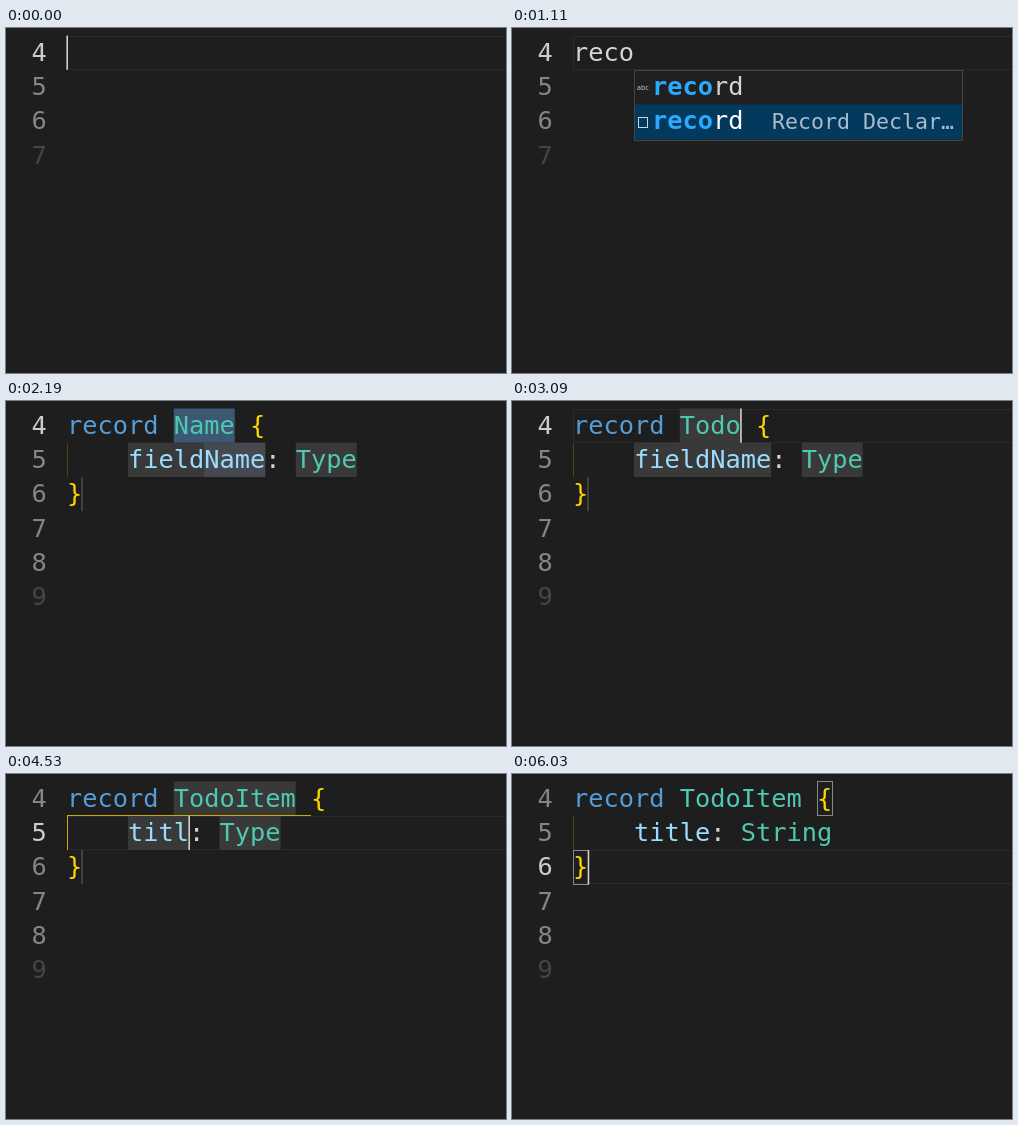
An HTML page with a canvas for the animation above (6.06 s loop, 500 by 345 pixels).

```html
<!DOCTYPE html>
<html lang="en">
<head>
<meta charset="utf-8">
<title>Record snippet</title>
<style>
html, body { margin: 0; width: 100%; height: 100%; overflow: hidden; background: #1e1e1e; }
canvas { display: block; width: 500px; height: 345px; }
</style>
</head>
<body>
<canvas id="stage"></canvas>
<script>
const LOOP = 6060, W = 500, H = 345;
const CELL = 15.25, LEFT = 61, TOP = 7.5, ROW = 34.25;
const ADVANCE = 0.602, SIZE = CELL / ADVANCE;
const MONO = '"DejaVu Sans Mono", "Noto Sans Mono", monospace';

const COLOR = {
  bg: '#1e1e1e', text: '#d4d4d4', keyword: '#569cd6', type: '#4ec9b0',
  field: '#9cdcfe', brace: '#ffd700', number: '#858585', active: '#cccccc',
  dim: '#454545', line: '#2a2a2a', slot: '#393939', select: '#3d5875',
  match: '#464a50', caret: '#d0d0d0'
};

// Key times in ms
const KEYS = {
  start: [300, 360, 540, 600],
  name: [2520, 2580, 2760, 2820, 3150, 3210, 3390, 3450],
  field: [4230, 4290, 4470, 4530, 4710],
  type: [5250, 5310, 5490, 5550, 5670, 5730]
};
const POPUP = 780, DOWN = 1020, ACCEPT = 1320, TAB1 = 3690, TAB2 = 4950, DONE = 5910;
const PRESSES = [...Object.values(KEYS).flat(), ACCEPT, TAB1, TAB2, DONE];

const canvas = document.getElementById('stage');
const ctx = canvas.getContext('2d');
const scale = window.devicePixelRatio || 1;
canvas.width = W * scale;
canvas.height = H * scale;

const colX = col => LEFT + col * CELL;
const rowY = row => TOP + row * ROW;

function box(x, y, w, h, color) {
  ctx.fillStyle = color;
  ctx.fillRect(x, y, w, h);
}

function frame(x, y, w, h, color) {
  ctx.strokeStyle = color;
  ctx.lineWidth = 1;
  ctx.strokeRect(x + 0.5, y + 0.5, w - 1, h - 1);
}

function print(str, x, row, color, size = SIZE, weight = 400) {
  ctx.font = `${weight} ${size}px ${MONO}`;
  ctx.fillStyle = color;
  ctx.fillText(str, x, Math.round(rowY(row) + 25.3));
}

function cells(row, col, count, color) {
  box(colX(col), rowY(row), count * CELL, ROW, color);
}

function typed(word, times, t) {
  return word.slice(0, times.filter(k => k <= t).length);
}

function lineNumbers(last, current) {
  for (let n = 4; n <= last; n++) {
    const color = n === current ? COLOR.active : n === last ? COLOR.dim : COLOR.number;
    print(String(n), 25.5, n - 4, color);
  }
}

function currentLine(row) {
  frame(LEFT, Math.round(rowY(row)), W - LEFT + 2, 34, COLOR.line);
}

function caret(row, col, t) {
  const last = Math.max(0, ...PRESSES.filter(k => k <= t));
  const phase = (t - last) % 1000;
  let alpha = 0;
  if (phase < 400) alpha = 1;
  else if (phase < 500) alpha = (500 - phase) / 100;
  else if (phase > 920) alpha = (phase - 920) / 80;
  ctx.globalAlpha = alpha;
  box(colX(col) - 0.6, rowY(row), 1.6, ROW, COLOR.caret);
  ctx.globalAlpha = 1;
}

function popup(t) {
  const x = 122, y = 42, w = 329, h = 71, pick = t >= DOWN ? 1 : 0;
  box(x, y, w, h, '#202020');
  box(x + 1, pick ? 76.5 : 43, w - 2, 35, '#04395e');
  frame(x, y, w, h, '#454545');
  for (let i = 0; i < 2; i++) {
    const row = i + 1;
    print('reco', 140, row, '#2aaaff', SIZE, 700);
    print('rd', 140 + 4 * CELL, row, i === pick ? '#ffffff' : COLOR.text);
  }
  ctx.font = '7px "Open Sans", sans-serif';
  ctx.fillStyle = COLOR.text;
  ctx.fillText('abc', 125, 62);
  frame(126, 89, 10, 11, COLOR.text);
  if (pick) print('Record Declar…', 260, 2, '#a9bccb', 13 / ADVANCE);
}

function drawStart(t) {
  const word = typed('reco', KEYS.start, t);
  currentLine(0);
  lineNumbers(7, 4);
  print(word, LEFT, 0, COLOR.text);
  caret(0, word.length, t);
  if (t >= POPUP) popup(t);
}

function drawRecord(t) {
  const name = typed('TodoItem', KEYS.name, t) || 'Name';
  const field = typed('title', KEYS.field, t) || 'fieldName';
  const type = typed('String', KEYS.type, t) || 'Type';
  const step = t < TAB1 ? 0 : t < TAB2 ? 1 : t < DONE ? 2 : 3;
  const row = [0, 1, 1, 2][step];
  const typeCol = 4 + field.length + 2;
  const braceCol = 7 + name.length + 1;
  const ends = [7 + name.length, 4 + field.length, typeCol + type.length, 1];
  const firstKey = [KEYS.name, KEYS.field, KEYS.type][step];
  const selected = step < 3 && t < firstKey[0];

  if (!selected) currentLine(row);

  if (step < 3) {
    const slots = [[0, 7, name], [1, 4, field], [1, typeCol, type]];
    slots.forEach(([r, c, word], i) =>
      cells(r, c, word.length, selected && i === step ? COLOR.select : COLOR.slot));
    if (selected && step === 0) cells(1, 9, 4, COLOR.match);
    box(75.5, rowY(2), 1, ROW, '#626262');
  }

  // Bracket pair guide
  if (row === 1) {
    box(LEFT, 41, braceCol * CELL, 1, '#c9ab0b');
    box(LEFT, 41, 1, 35, '#c9ab0b');
  } else {
    box(LEFT, 42, 1, 34, '#4b431b');
  }

  if (step === 3) {
    for (const [r, c] of [[0, braceCol], [2, 0]]) {
      frame(Math.round(colX(c)), Math.floor(rowY(r)), 16, 35, '#888888');
    }
  }

  lineNumbers(9, 4 + row);
  print('record', LEFT, 0, COLOR.keyword);
  print(name, colX(7), 0, COLOR.type);
  print('{', colX(braceCol), 0, COLOR.brace);
  print(field, colX(4), 1, COLOR.field);
  print(':', colX(4 + field.length), 1, COLOR.text);
  print(type, colX(typeCol), 1, COLOR.type);
  print('}', LEFT, 2, COLOR.brace);
  caret(row, ends[step], t);
}

function draw(now) {
  const t = Math.floor((now % LOOP) / 30) * 30;
  ctx.setTransform(scale, 0, 0, scale, 0, 0);
  box(0, 0, W, H, COLOR.bg);
  if (t < ACCEPT) drawStart(t);
  else drawRecord(t);
}

const begin = performance.now();
function tick() {
  draw(performance.now() - begin);
  requestAnimationFrame(tick);
}
tick();
</script>
</body>
</html>
```
